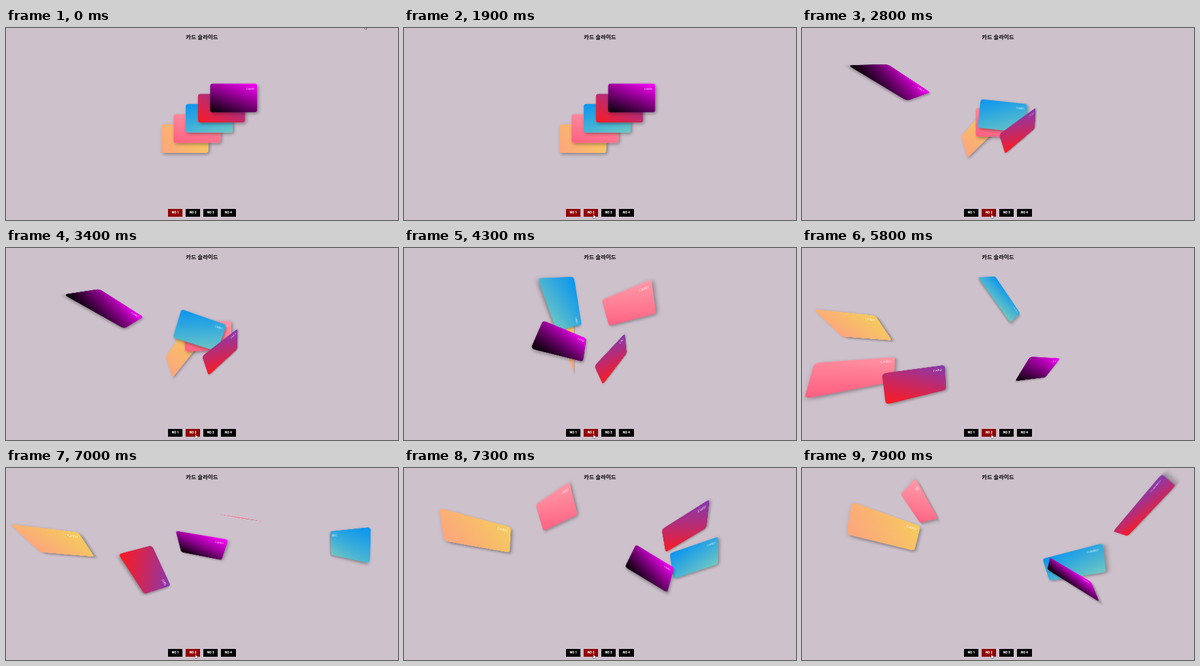
Write an HTML page that moves like this. It is 600 px wide and 295 px high and loops after 8000 ms.

```html
<!DOCTYPE html>
<html lang="ko">
<head>
<meta charset="utf-8">
<title>카드 슬라이드</title>
<style>
  html, body { margin: 0; width: 100%; height: 100%; overflow: hidden; background: #cdc1cc; }
  #stage {
    position: relative; width: 600px; height: 295px; overflow: hidden;
    perspective: 140px; perspective-origin: 50% 50%;
  }
  h1 {
    position: absolute; left: 0; top: 7px; width: 600px; margin: 0; text-align: center;
    font: 700 8.5px/12px "Noto Sans CJK KR", "Noto Sans CJK", sans-serif; color: #000;
  }
  .card {
    position: absolute; left: 0; top: 0; width: 72.3px; height: 44px; margin: -22px 0 0 -36.15px;
    border-radius: 4px; box-shadow: 2px 2px 5px rgba(0, 0, 0, .36);
  }
  .card span {
    position: absolute; right: 4.5px; top: 4.5px; color: rgba(255, 255, 255, .85);
    font: 4.5px/5.5px Lato, sans-serif;
  }
  .button {
    position: absolute; top: 277.8px; width: 22.3px; height: 12.2px; text-align: center;
    font: 900 4.8px/12px Roboto, sans-serif; color: #fff;
  }
  #pointer { position: absolute; left: 0; top: 0; overflow: visible; }
  #pointer path { fill: #fff; stroke: #222; stroke-width: .5; }
</style>
</head>
<body>
<div id="stage"><h1>카드 슬라이드</h1></div>
<script>
const LOOP = 8000, CLICK = 1950;
const stage = document.getElementById('stage');

const clamp = t => Math.max(0, Math.min(1, t));
const mix = (a, b, t) => a + (b - a) * t;
const smooth = t => t * t * (3 - 2 * t);
const easeIn = t => t * t;
const easeOut = t => 1 - (1 - t) ** 3;
const overshoot = t => 1 + 3 * (t - 1) ** 3 + 2 * (t - 1) ** 2;

// Every card flies through one pose per beat, all on the same easing.
const beats = [
  { at: CLICK },
  { at: 2800, ease: easeIn },
  { at: 4300, ease: easeIn },
  { at: 5800, ease: overshoot },
  { at: 7000, ease: easeOut },
  { at: 7900, ease: easeOut }
];

// Centre, spin in degrees, and how far the right and bottom sides lean to the viewer.
const pose = (x, y, spin = 0, leanX = 0, leanY = 0) => ({ x, y, spin, leanX, leanY });

const cards = [
  { fill: '60deg, #fca57e, #f5cc5c', flight: [
    pose(269, 159, -40, 36, 18), pose(256, 150, -70, 63, -6), pose(85, 121, 7, -3, -37),
    pose(80, 115, 9, -6, -40), pose(131, 95, 18, -26, -15)] },
  { fill: '15deg, #ff5f80, #ff98a6', flight: [
    pose(302, 145), pose(342, 89, -14, 22, -22), pose(87, 193, -9, -39, 23),
    pose(357, 76, -35, -10, 59), pose(178, 58, -3, 34, -39)] },
  { fill: '160deg, #0894f0, #70c8c2', flight: [
    pose(307, 135, 6), pose(245, 90, 80, -27, -35), pose(306, 77, 48, -40, 21),
    pose(521, 117, -17, -57, 8), pose(413, 149, -21, 20, -25)] },
  { fill: '30deg, #fd1a20, #833ab4', flight: [
    pose(334, 158, -26, -38, -26), pose(322, 169, -31, -48, -17), pose(178, 207, -2, -28, -4),
    pose(216, 160, 75, -14, -22), pose(520, 65, -80, -12, -33)] },
  { fill: '20deg, #000, #f0f', flight: [
    pose(145, 82, 28, -40, 42), pose(245, 145, 13, -40, 20), pose(363, 186, 15, -24, -32),
    pose(298, 121, 8, 16, -55), pose(411, 166, 41, -21, 46)] }
];

function add(className, html) {
  const el = document.createElement('div');
  el.className = className;
  el.innerHTML = html;
  return stage.appendChild(el);
}

cards.forEach((card, i) => {
  card.el = add('card', '<span>CARD</span>');
  card.el.style.background = `linear-gradient(${card.fill})`;
  card.flight.unshift(pose(273.7 + 18.7 * i, 170 - 15.6 * i));
});

const buttons = [1, 2, 3, 4].map(n => {
  const el = add('button', 'NO ' + n);
  el.style.left = 220.9 + 27.1 * n + 'px';
  return el;
});

stage.insertAdjacentHTML('beforeend', `<svg id="pointer" width="6" height="8">
  <path id="arrow" d="M0 0V5L1.2 4 2 5.6 2.8 5.2 2.1 3.8H3.6Z"/>
  <path id="hand" d="M-.6 0Q0-.8.6 0V2L2.8 2.6V4.4L2.2 6H-.6L-2 3.6-1.5 3-.6 3.6Z"/></svg>`);
const [pointer, arrow, hand] = ['pointer', 'arrow', 'hand'].map(id => document.getElementById(id));

function drawCards(time) {
  let next = beats.findIndex(beat => time < beat.at);
  if (next < 0) next = beats.length - 1;
  next = Math.max(1, next);
  const from = beats[next - 1].at, { at, ease } = beats[next];
  const t = ease(clamp((time - from) / (at - from)));

  cards.forEach(({ el, flight }) => {
    const a = flight[next - 1], b = flight[next];
    const now = key => mix(a[key], b[key], t);
    const leanX = now('leanX'), leanY = now('leanY');
    el.style.transform = `translate(${now('x')}px, ${now('y')}px)
      rotate3d(${leanY}, ${-leanX}, 0, ${Math.hypot(leanX, leanY)}deg)
      rotate(${now('spin')}deg)`;
  });
}

function drawControls(time) {
  const hover = clamp((time - 900) / 250), first = time > CLICK ? 0 : 1;
  [first, hover, 0, 0].forEach((amount, i) => {
    buttons[i].style.background = `rgb(${Math.round(146 * amount)}, 0, 0)`;
  });

  const t = smooth(clamp((time - 50) / 950));
  pointer.style.transform = `translate(${mix(549, 290.5, t)}px, ${mix(-3, 286.5, t)}px)`;
  arrow.style.display = time < 900 ? '' : 'none';
  hand.style.display = time < 900 ? 'none' : '';
}

const start = performance.now();
function tick() {
  const time = (performance.now() - start) % LOOP;
  drawCards(time);
  drawControls(time);
  requestAnimationFrame(tick);
}
tick();
</script>
</body>
</html>
```
